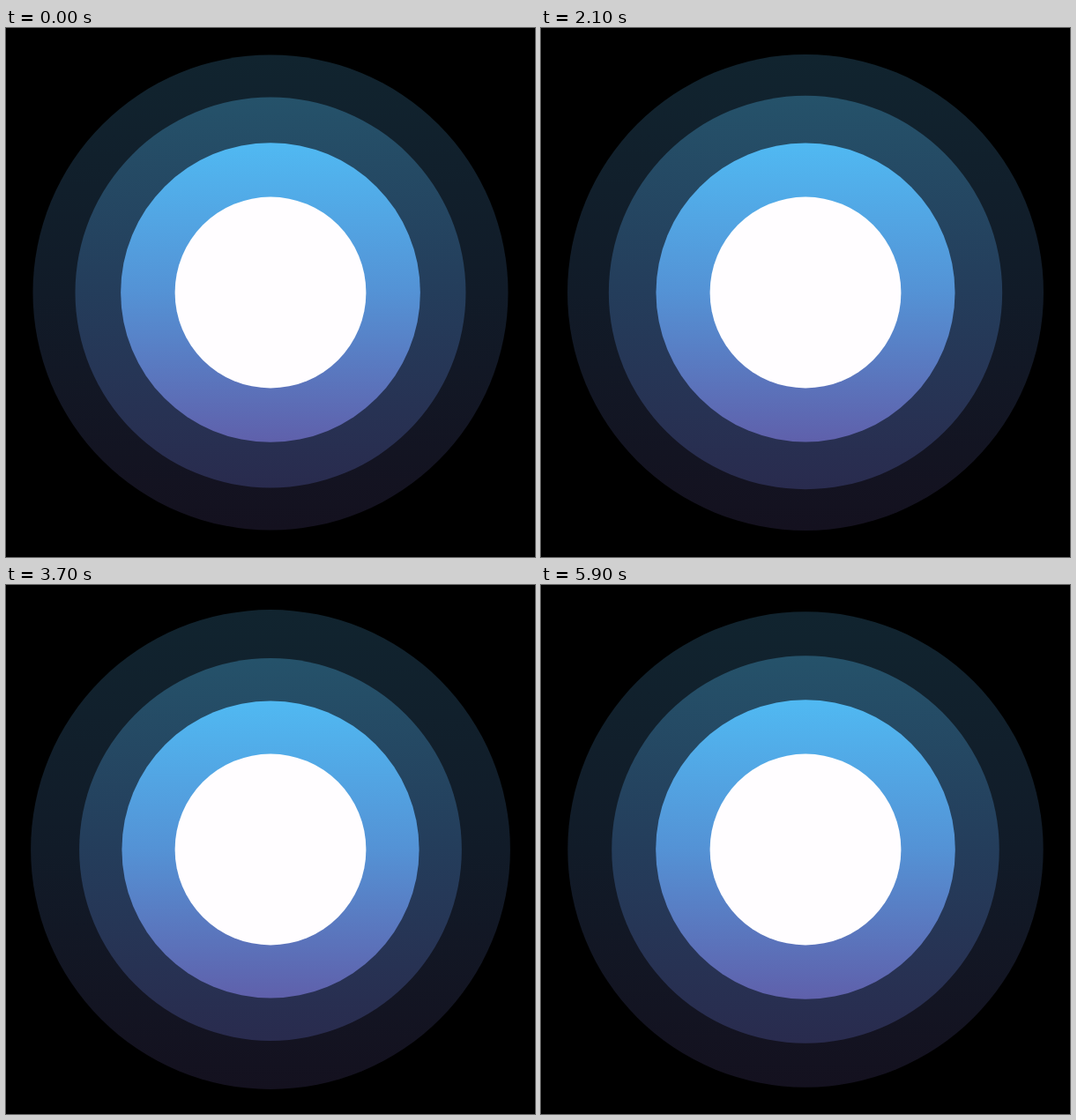
Write an HTML page with a canvas that moves like this. It is 600x600 px and loops after 6000 ms.

```html
<!DOCTYPE html>
<html lang="en">
<head>
<meta charset="utf-8">
<title>Pulsing rings</title>
<style>
  html, body { margin: 0; width: 100%; height: 100%; overflow: hidden; background: #000; }
  canvas { display: block; width: 600px; height: 600px; }
</style>
</head>
<body>
<canvas id="stage" width="600" height="600"></canvas>
<script>
const ctx = document.getElementById("stage").getContext("2d");
const CENTER = 300;
const PERIOD = 2000;
const STEP = 100;

// Each ring swings by 5% of its smallest radius; lead is its phase in ms.
const rings = [
  { radius: 276.2, swing: 6.7, lead: 1022, colors: ["#11242f", "#111b28", "#14111f"] },
  { radius: 221.1, swing: 5.5, lead: -478, colors: ["#25526a", "#243d5b", "#292b4e"] },
  { radius: 165.8, swing: 4.1, lead: 38, colors: ["#50b9f2", "#5492d5", "#5f60ab"] }
];

function disc(radius, fill) {
  ctx.fillStyle = fill;
  ctx.beginPath();
  ctx.arc(CENTER, CENTER, radius, 0, Math.PI * 2);
  ctx.fill();
}

function verticalGradient(radius, colors) {
  const gradient = ctx.createLinearGradient(0, CENTER - radius, 0, CENTER + radius);
  colors.forEach((color, i) => gradient.addColorStop(i / (colors.length - 1), color));
  return gradient;
}

function draw(time) {
  ctx.fillStyle = "#000";
  ctx.fillRect(0, 0, 600, 600);
  for (const { radius, swing, lead, colors } of rings) {
    const r = radius + swing * Math.cos((time + lead) / PERIOD * Math.PI * 2);
    disc(r, verticalGradient(r, colors));
  }
  disc(108.4, "#fffdff");
}

const start = performance.now();

function tick() {
  const elapsed = performance.now() - start;
  // The motion advances in steps; the small offset absorbs timer rounding.
  draw(Math.floor((elapsed + 4) / STEP) * STEP % 6000);
  requestAnimationFrame(tick);
}
tick();
</script>
</body>
</html>
```
